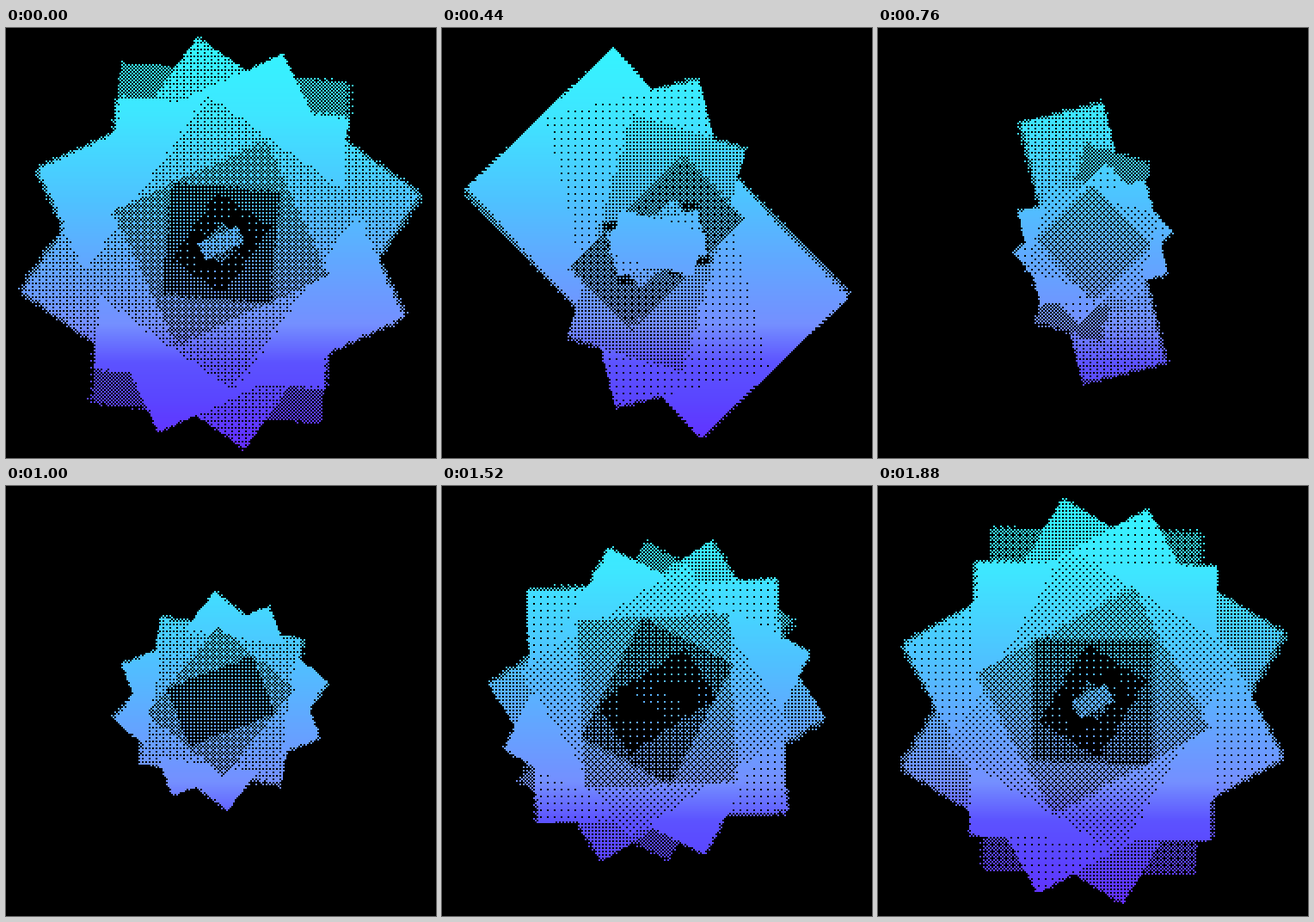
Write an HTML page with a canvas that moves like this. It is 500 px wide and 500 px high and loops after 1920 ms.

```html
<!DOCTYPE html>
<html lang="en">
<head>
<meta charset="utf-8">
<title>Dithered twisting rectangles</title>
<style>
  html, body { margin: 0; width: 100%; height: 100%; overflow: hidden; background: #000; }
  canvas { display: block; width: 500px; height: 500px; image-rendering: pixelated; }
</style>
</head>
<body>
<canvas id="stage" width="250" height="250"></canvas>
<script>
const SIZE = 250, LOOP = 1920, STEP = 40, COUNT = 12, TAU = Math.PI * 2;
const SHUTTER = 20, SAMPLES = 5;
const BAYER = [5, 15, 7, 13, 10, 0, 8, 2, 6, 12, 4, 14, 9, 3, 11, 1];

// position down the stage, r, g, b
const STOPS = [
  [0, 50, 248, 255], [0.2, 62, 230, 255], [0.4, 78, 194, 255], [0.55, 98, 166, 255],
  [0.69, 116, 143, 255], [0.78, 92, 82, 255], [0.86, 90, 70, 255], [1, 100, 42, 255]
];

function makeContext() {
  const c = document.createElement('canvas');
  c.width = c.height = SIZE;
  return c.getContext('2d', { willReadFrequently: true });
}

const out = document.getElementById('stage').getContext('2d');
const layer = makeContext();
const blend = makeContext();
const image = out.createImageData(SIZE, SIZE);

function colorAt(v) {
  let k = 1;
  while (k < STOPS.length - 1 && STOPS[k][0] < v) k++;
  const a = STOPS[k - 1], b = STOPS[k];
  const f = (v - a[0]) / (b[0] - a[0]);
  return [1, 2, 3].map(n => Math.round(a[n] + (b[n] - a[n]) * f));
}
const rows = Array.from({ length: SIZE }, (_, y) => colorAt(y / (SIZE - 1)));

const pulse = turns => 0.6 + 0.4 * Math.cos(TAU * turns);

// Opaque rectangles from back to front, each smaller and further along its cycle.
function drawStack(ctx, t) {
  const p = t / LOOP;
  ctx.setTransform(1, 0, 0, 1, 0, 0);
  ctx.fillStyle = '#000';
  ctx.fillRect(0, 0, SIZE, SIZE);
  for (let i = 0; i < COUNT; i++) {
    const side = 200 * (1 - i / 15);
    const w = side * pulse((t - 425) / LOOP + i / 12);
    const h = side * pulse((t + 40) / LOOP + i / 24);
    const grey = Math.round(127.5 + 127.5 * Math.cos(TAU * p + 0.6 * (i - 2.55)));
    const angle = (5 + 180 * p + 30 * i) * Math.PI / 180;
    ctx.setTransform(1, 0, 0, 1, SIZE / 2, SIZE / 2);
    ctx.rotate(angle);
    ctx.fillStyle = `rgb(${grey},${grey},${grey})`;
    ctx.fillRect(-w / 2, -h / 2, w, h);
  }
}

function render(t) {
  // average a few moments for soft moving edges
  for (let k = 0; k < SAMPLES; k++) {
    drawStack(layer, t + SHUTTER * (k / (SAMPLES - 1) - 0.5));
    blend.globalAlpha = 1 / (k + 1);
    blend.drawImage(layer.canvas, 0, 0);
  }
  const src = blend.getImageData(0, 0, SIZE, SIZE).data;
  const dst = image.data;
  for (let y = 0, n = 0; y < SIZE; y++) {
    const color = rows[y];
    for (let x = 0; x < SIZE; x++, n += 4) {
      const limit = (BAYER[(y & 3) * 4 + (x & 3)] + 0.4) / 16 * 255;
      const lit = src[n] > limit;
      for (let c = 0; c < 3; c++) dst[n + c] = lit ? color[c] : 0;
      dst[n + 3] = 255;
    }
  }
  out.putImageData(image, 0, 0);
}

const start = performance.now();
let shown = -1;
function tick() {
  const elapsed = Math.max(0, performance.now() - start) % LOOP;
  const t = Math.floor(elapsed / STEP) * STEP;
  if (t !== shown) render(shown = t);
  requestAnimationFrame(tick);
}
tick();
</script>
</body>
</html>
```
